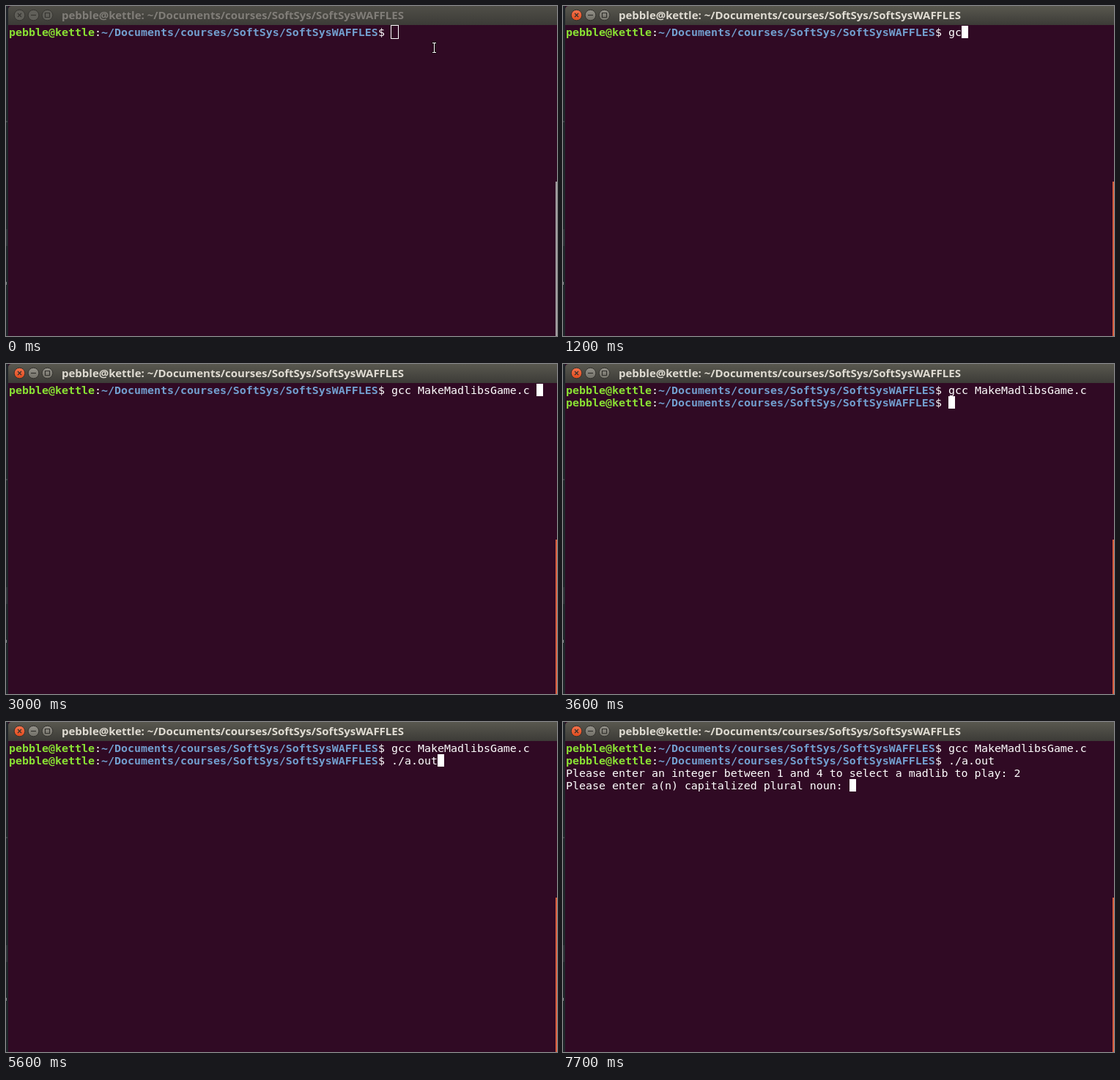
Recreate the animation shown at these times as an HTML page with a canvas. Size 752 by 451 pixels, loop 8000 ms.

```html
<!DOCTYPE html>
<html lang="en">
<head>
<meta charset="utf-8">
<title>Terminal</title>
<style>
html, body { margin: 0; width: 100%; height: 100%; overflow: hidden; background: #300a24; }
canvas { display: block; }
</style>
</head>
<body>
<canvas id="stage" width="752" height="451"></canvas>
<script>
const ctx = document.getElementById('stage').getContext('2d');
const W = 752, H = 451, LOOP = 8000;
const LEFT = 4, TOP = 27, CELL = 9, ROW = 17;
const MONO = '14.95px "DejaVu Sans Mono", monospace';
const USER = 'pebble@kettle';
const PATH = '~/Documents/courses/SoftSys/SoftSysWAFFLES';
const PROMPT_LEN = USER.length + PATH.length + 3;

const COMPILE = 'gcc MakeMadlibsGame.c ';
const RUN = './a.out';
const ASK = 'Please enter an integer between 1 and 4 to select a madlib to play: ';
const NOUN = 'Please enter a(n) capitalized plural noun: ';

// [time, characters visible]
const COMPILE_KEYS = [[900, 1], [1200, 2], [1400, 3], [1900, 4], [2300, 5], [2800, 7], [3000, 22]];
const RUN_KEYS = [[4100, 1], [4400, 2], [4800, 3], [5000, 4], [5200, 5], [5500, 6], [5600, 7]];
const FOCUS = 300, POINTER_HIDE = 800, COMPILED = 3600, STARTED = 5800;
const BLINK_OFF = 6400, BLINK_ON = 7000, ANSWER = 7200, NEXT = 7700;

function typed(text, keys, t) {
  let n = 0;
  for (const [at, count] of keys) if (t >= at) n = count;
  return text.slice(0, n);
}

function rect(x, y, w, h, color) {
  ctx.fillStyle = color;
  ctx.fillRect(x, y, w, h);
}

function write(text, col, row, color = '#ffffff', bold = false) {
  ctx.font = (bold ? 'bold ' : '') + MONO;
  ctx.fillStyle = color;
  ctx.fillText(text, LEFT + col * CELL, TOP + 14 + row * ROW);
}

function promptLine(row, command) {
  write(USER, 0, row, '#8ae234', true);
  write(':', USER.length, row);
  write(PATH, USER.length + 1, row, '#729fcf', true);
  write('$ ' + command, PROMPT_LEN - 2, row);
  return [PROMPT_LEN + command.length, row];
}

function button(x, kind, focused) {
  const y = 12.5;
  ctx.beginPath();
  ctx.arc(x, y, 7.3, 0, 7);
  if (focused) {
    const g = ctx.createLinearGradient(0, 5, 0, 20);
    g.addColorStop(0, kind === 'close' ? '#f3744f' : '#94928a');
    g.addColorStop(1, kind === 'close' ? '#df4a1c' : '#716f67');
    ctx.fillStyle = g;
  } else {
    ctx.fillStyle = '#605f59';
  }
  ctx.fill();
  ctx.lineWidth = 1;
  ctx.strokeStyle = focused ? '#31302c' : '#363531';
  ctx.stroke();
  ctx.beginPath();
  if (kind === 'close') {
    ctx.moveTo(x - 2.5, y - 2.5); ctx.lineTo(x + 2.5, y + 2.5);
    ctx.moveTo(x + 2.5, y - 2.5); ctx.lineTo(x - 2.5, y + 2.5);
  } else if (kind === 'min') {
    ctx.moveTo(x - 3.5, y); ctx.lineTo(x + 3.5, y);
  } else {
    ctx.rect(x - 3, y - 3, 6, 6);
  }
  ctx.lineWidth = 1.2;
  ctx.stroke();
}

function frame(focused) {
  rect(0, 0, W, H, '#300a24');
  rect(0, 0, 3, H, '#20252a');
  rect(0, 305, 2, 23, '#30343a');
  rect(0, 157, 2, 2, '#3d4146');
  rect(0, 377, 1, 4, '#8a8d90');

  const bar = ctx.createLinearGradient(0, 0, 0, 26);
  bar.addColorStop(0, focused ? '#59584f' : '#504f48');
  bar.addColorStop(1, '#3c3b37');
  ctx.fillStyle = bar;
  ctx.beginPath();
  ctx.moveTo(3, 26);
  ctx.lineTo(3, 5);
  ctx.quadraticCurveTo(3, 0, 8, 0);
  ctx.lineTo(W, 0);
  ctx.lineTo(W, 26);
  ctx.fill();

  button(18.5, 'close', focused);
  button(37.5, 'min', focused);
  button(56.5, 'max', focused);

  ctx.font = 'bold 15px "Open Sans", "Noto Sans", sans-serif';
  ctx.fillStyle = focused ? '#dfdbd2' : '#807d78';
  ctx.fillText(USER + ': ' + PATH, 76, 18);

  rect(750, 240, 2, H - 240, focused ? '#d9603f' : '#a29d9f');
}

function cursor(col, row, focused) {
  const x = LEFT + col * CELL, y = TOP + row * ROW;
  if (focused) {
    rect(x, y, CELL, ROW, '#ffffff');
  } else {
    ctx.strokeStyle = '#ffffff';
    ctx.lineWidth = 1;
    ctx.strokeRect(x - 0.5, y - 0.5, CELL + 1, ROW + 1);
  }
}

function pointer() {
  for (const [grow, color] of [[1, '#1a0513'], [0, '#ffffff']]) {
    for (const [x, y, w, h] of [[582, 50, 5, 1], [584, 50, 1, 14], [582, 63, 5, 1]])
      rect(x - grow, y - grow, w + 2 * grow, h + 2 * grow, color);
  }
}

function draw(t) {
  const focused = t >= FOCUS;
  frame(focused);

  let at = promptLine(0, typed(COMPILE, COMPILE_KEYS, t));
  if (t >= COMPILED) at = promptLine(1, typed(RUN, RUN_KEYS, t));
  if (t >= STARTED) {
    const line = ASK + (t >= ANSWER ? '2' : '');
    write(line, 0, 2);
    at = [line.length, 2];
  }
  if (t >= NEXT) {
    write(NOUN, 0, 3);
    at = [NOUN.length, 3];
  }
  if (t < BLINK_OFF || t >= BLINK_ON) cursor(...at, focused);
  if (t < POINTER_HIDE) pointer();
}

const start = performance.now();
function tick() {
  draw((performance.now() - start) % LOOP);
  requestAnimationFrame(tick);
}
tick();
</script>
</body>
</html>
```
